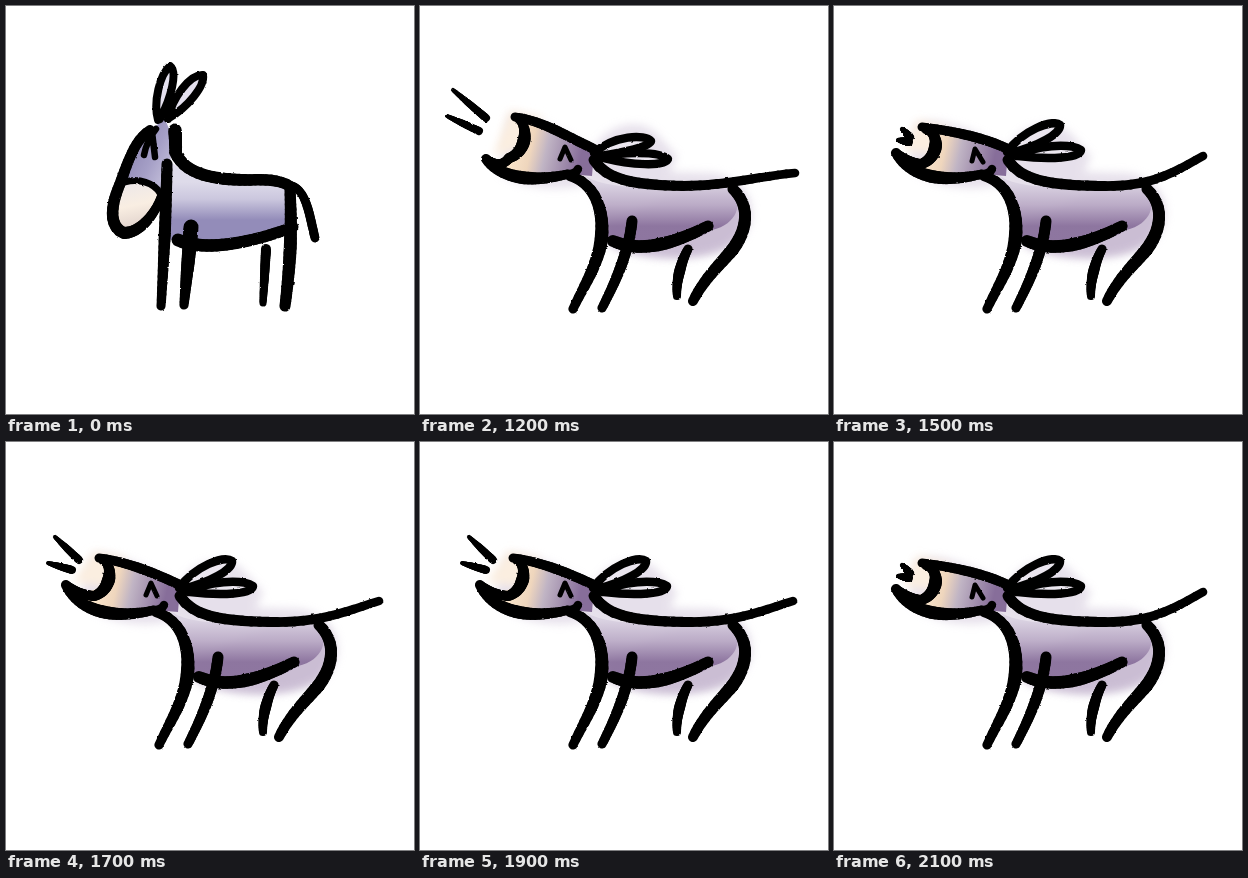
An HTML page for the animation above (2.2 s loop, 408x408 px).

```html
<!DOCTYPE html>
<html lang="en">
<head>
<meta charset="utf-8">
<title>Braying donkey</title>
<style>
  html, body { margin: 0; width: 100%; height: 100%; overflow: hidden; background: #fff; }
  svg { display: block; width: 100%; height: 100%; }
  .ink { fill: none; stroke: #000; stroke-linecap: round; stroke-linejoin: round; }
</style>
</head>
<body>
<svg viewBox="0 0 408 408">
  <defs>
    <filter id="rough" filterUnits="userSpaceOnUse" x="0" y="0" width="408" height="408">
      <feTurbulence type="fractalNoise" baseFrequency=".2" numOctaves="2" seed="4"/>
      <feDisplacementMap in="SourceGraphic" scale="2" xChannelSelector="R" yChannelSelector="G"/>
    </filter>
    <filter id="soft" filterUnits="userSpaceOnUse" x="0" y="0" width="408" height="408">
      <feGaussianBlur stdDeviation="4"/>
    </filter>
    <linearGradient id="restBody" gradientUnits="userSpaceOnUse" x1="0" y1="176" x2="0" y2="214">
      <stop stop-color="#dedbea"/><stop offset=".45" stop-color="#cbc7de"/><stop offset="1" stop-color="#938cb9"/>
    </linearGradient>
    <linearGradient id="restHead" gradientUnits="userSpaceOnUse" x1="124" y1="140" x2="162" y2="160">
      <stop stop-color="#8f88b4"/><stop offset=".6" stop-color="#a59fc6"/><stop offset="1" stop-color="#bcb7d5"/>
    </linearGradient>
    <linearGradient id="restMuzzle" gradientUnits="userSpaceOnUse" x1="122" y1="178" x2="132" y2="226">
      <stop stop-color="#eee8e8"/><stop offset=".45" stop-color="#f9eee2"/><stop offset="1" stop-color="#dccdc8"/>
    </linearGradient>
    <linearGradient id="brayBody" gradientUnits="userSpaceOnUse" x1="0" y1="178" x2="0" y2="220">
      <stop stop-color="#d9d1e1"/><stop offset=".5" stop-color="#b9a9c5"/><stop offset="1" stop-color="#876e9a"/>
    </linearGradient>
    <linearGradient id="brayHead" gradientUnits="userSpaceOnUse" x1="92" y1="138" x2="160" y2="154">
      <stop stop-color="#fbe6cb"/><stop offset=".28" stop-color="#efd6bd"/>
      <stop offset=".5" stop-color="#c0b4c4"/><stop offset="1" stop-color="#876e9a"/>
    </linearGradient>
  </defs>
  <g id="stage"></g>
</svg>
<script>
const stage = document.getElementById('stage');
const probe = document.createElementNS('http://www.w3.org/2000/svg', 'path');

const ink = (width, d, fill = 'none') =>
  `<path class="ink" stroke-width="${width}" d="${d}" style="fill:${fill}"/>`;
const paint = (fill, d, extra = '') => `<path fill="${fill}" d="${d}" ${extra}/>`;
const inked = strokes => `<g filter="url(#rough)">${strokes.join('')}</g>`;

// A stroke whose width runs from start through middle to end.
function brush(start, middle, end, d) {
  const steps = 24;
  probe.setAttribute('d', d);
  const length = probe.getTotalLength();
  const at = i => {
    const p = probe.getPointAtLength(length * i / steps);
    return `${p.x.toFixed(1)} ${p.y.toFixed(1)}`;
  };
  let strokes = '';
  for (let i = 0; i < steps; i++) {
    const u = 2 * (i + .5) / steps;
    const width = u < 1 ? start + (middle - start) * u : middle + (end - middle) * (u - 1);
    strokes += ink(width.toFixed(1), `M${at(i)}L${at(i + 1)}`);
  }
  return strokes;
}

function rest() {
  return paint('url(#restBody)', 'M160 150C178 174 215 177 281 179L286 222C245 238 195 245 160 232Z') +
    paint('url(#restHead)', 'M144 124L159 113L166 130L163 182L154 192C148 176 134 173 120 176Q127 142 144 124Z') +
    paint('url(#restMuzzle)', 'M118 178C107 203 105 226 119 227C135 226 151 206 154 188C146 177 132 172 118 178Z') +
    inked([
      ink(8, 'M152 114C147 96 154 68 164 60C172 66 165 92 154 113', '#e4e0ee'),
      ink(8, 'M162 113C166 92 184 68 197 69C199 80 182 101 163 112', '#e4e0ee'),
      brush(10, 11, 12, 'M144 124C127 135 121 160 112 183C104 203 104 222 118 227'),
      brush(12, 10, 8, 'M118 227C134 227 151 207 156 187'),
      ink(7, 'M119 176C133 172 148 177 154 187'),
      ink(6.5, 'M150 123Q141 134 138 149M146 126L149 151'),
      brush(13, 13, 12, 'M169 124L170 146'),
      brush(12, 12, 11, 'M169 146C180 171 214 174 246 174C264 173 277 175 285 181'),
      brush(8, 9, 9, 'M284 179C300 183 303 207 309 232'),
      brush(11, 12, 9, 'M161 158C160 205 158 251 155 300'),
      brush(15, 13, 9, 'M185 221C183 250 180 275 178 299'),
      brush(13, 12, 11, 'M172 234C198 246 245 237 287 221'),
      brush(11, 13, 11, 'M284 184C286 226 284 261 279 300'),
      brush(10, 9, 7, 'M260 243L257 297')
    ]);
}

function bray({ snout, mouth, jaw, ears, eye, tail, lines }) {
  const [x, y] = snout;
  const [mx, my] = mouth;
  const [jx, jy] = jaw;
  const torso = 'M164 168C177 182 223 183 314 183C322 198 318 218 292 224C266 240 222 250 188 234C187 208 181 186 164 168Z';
  const glow = 'M264 183L316 183C332 202 327 232 303 243C270 256 226 255 192 240L184 220Z';
  const head = `M${x} ${y}C120 120 148 130 174 145L172 170L148 168C118 178 82 173 ${jx + 8} ${jy + 9}` +
    `Q${mx} ${my + 22} ${mx} ${my}Z`;
  const halo = 'M174 143C186 118 218 112 235 126L257 150L250 166L292 167C334 172 343 214 318 237C290 258 224 254 191 240' +
    `L171 178C133 187 96 181 ${jx + 16} ${jy + 16}L${x - 6} ${y - 2}Q106 105 174 143Z`;
  const breath = `M${x - 5} ${y - 7}L${x + 28} ${y}L${mx} ${my + 14}L${jx + 10} ${jy}Z`;
  return paint('#cfc3d8', halo, 'opacity=".5" filter="url(#soft)"') +
    paint('#fbeee0', breath, 'filter="url(#soft)"') +
    paint('#b8a6c4', glow, 'opacity=".6" filter="url(#soft)"') +
    paint('url(#brayBody)', torso, 'opacity=".9"') +
    paint('url(#brayHead)', head) +
    inked([
      ...ears.map(d => ink(8.5, d, '#ebe6ef')),
      brush(9, 10, 10, `M${x} ${y}C${x + 28} ${y + 4} 146 130 174 143`),
      brush(8, 13, 10, `M${x + 4} ${y + 3}C${mx + 8} ${my - 8} ${mx + 5} ${my + 18} ${mx - 12} ${my + 23}`),
      brush(10, 9, 9, `M${mx - 12} ${my + 23}Q${jx + 18} ${jy + 13} ${jx + 3} ${jy + 3}`),
      brush(10, 13, 9, `M${jx + 3} ${jy + 3}C${jx + 19} 174 116 176 148 168`),
      ink(8.5, 'M147 168Q155 169 158 163'),
      ink(5, eye),
      brush(11, 10, 8.5, `M174 154C188 177 224 179 266 180${tail}`),
      brush(10, 13.5, 9, 'M150 170C176 178 185 205 181 236C176 263 163 281 153 303'),
      brush(11, 11, 9, 'M212 215C209 246 195 277 182 302'),
      brush(12, 13, 11, 'M193 235C221 247 253 238 288 220'),
      brush(11, 13, 10, 'M313 183C333 202 325 228 312 244C297 262 284 273 273 295'),
      brush(9, 11, 8, 'M268 243C261 256 256 275 257 290'),
      ...lines.map(d => brush(4, 7, 8, d))
    ]);
}

const raisedEars = [
  'M173 146C189 124 218 113 226 119C227 128 204 140 177 147',
  'M182 150C201 139 236 137 247 144C247 152 216 154 184 150'
];
const flatEars = [
  'M174 147C194 129 225 128 231 135C230 141 204 146 179 150',
  'M181 151C201 146 240 145 248 153C245 161 211 159 183 152'
];
const eye = 'M140 153L145 141L151 154';

const poses = {
  rest: rest(),
  low: bray({
    snout: [88, 121], mouth: [99, 135], jaw: [59, 144], ears: raisedEars,
    eye: 'M138 155L141 143L149 156',
    tail: 'C316 181 335 169 369 150',
    lines: ['M64 134L75 136', 'M68 123L76 131']
  }),
  mid: bray({
    snout: [93, 116], mouth: [100, 131], jaw: [57, 140], ears: raisedEars, eye,
    tail: 'C314 181 341 169 373 159',
    lines: ['M49 95L73 118', 'M42 121L66 128']
  }),
  high: bray({
    snout: [95, 111], mouth: [101, 129], jaw: [63, 150], ears: flatEars, eye,
    tail: 'C310 179 341 170 375 167',
    lines: ['M33 84L66 112', 'M27 110L59 125']
  })
};

for (const [name, art] of Object.entries(poses))
  stage.insertAdjacentHTML('beforeend', `<g data-pose="${name}">${art}</g>`);
const layers = [...stage.children];

const LOOP = 2200, REST = 1000, STEP = 100;
const call = ['low', 'mid', 'high', 'mid', 'high', 'low'];

function poseAt(time) {
  const t = time % LOOP;
  return t < REST ? 'rest' : call[Math.floor((t - REST) / STEP) % call.length];
}

function draw(time) {
  const pose = poseAt(time);
  for (const layer of layers)
    layer.style.display = layer.dataset.pose === pose ? '' : 'none';
}

const start = performance.now();
function tick() {
  draw(performance.now() - start);
  requestAnimationFrame(tick);
}
tick();
</script>
</body>
</html>
```
